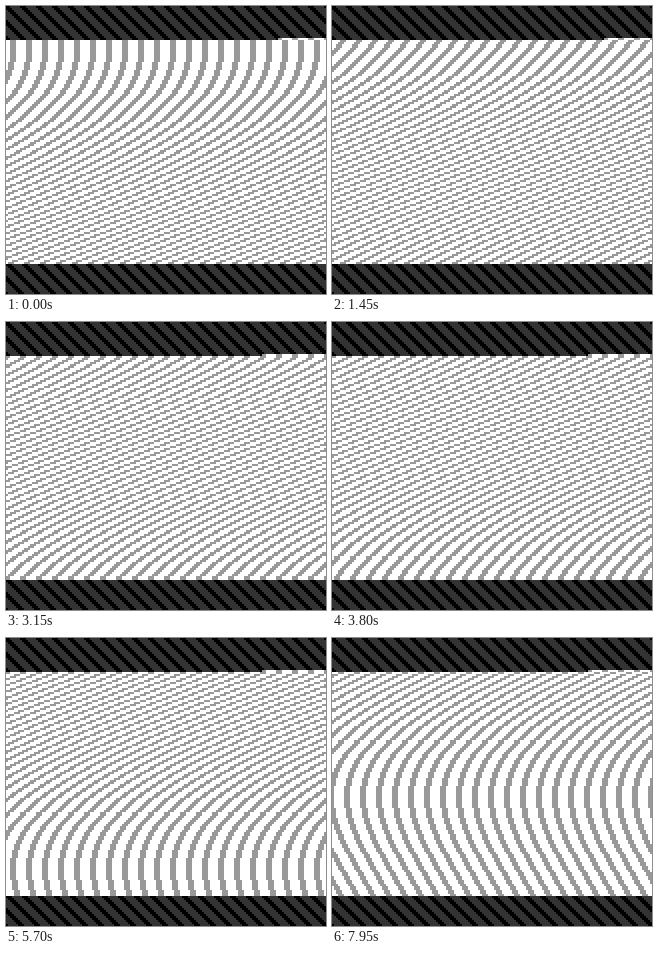
An HTML page with a canvas that plays this animation: 320 by 288 pixels, repeating every 8000 ms.

```html
<!DOCTYPE html>
<html lang="en">
<head>
<meta charset="utf-8">
<title>Raster wave</title>
<style>
  html, body { margin: 0; width: 100%; height: 100%; overflow: hidden; background: #000; }
  canvas { display: block; width: 320px; height: 288px; image-rendering: pixelated; }
</style>
</head>
<body>
<canvas id="screen" width="160" height="144"></canvas>
<script>
const W = 160, H = 144, TILE = 8, STRIPE = 3;
const TOP = 17, BOTTOM = 129;
const LOOP = 8000, TICK = 50, LINES_PER_TICK = 0.8, START = 0.7;
const AMPLITUDE = 64, PERIOD = 256, CENTER = 114;

const ctx = document.getElementById('screen').getContext('2d');
const mod = (n, m) => ((n % m) + m) % m;

function stripes(y, from, offset, base, ink) {
  ctx.fillStyle = base;
  ctx.fillRect(from, y, W - from, 1);
  ctx.fillStyle = ink;
  for (let x = mod(offset, TILE) - TILE; x < W; x += TILE) {
    const left = Math.max(x, from);
    const width = x + STRIPE - left;
    if (width > 0) ctx.fillRect(left, y, width, 1);
  }
}

const bandOffset = y => y - 1;

function waveOffset(y, shift) {
  const angle = 2 * Math.PI * (y + shift - CENTER) / PERIOD;
  return 6 - y - Math.floor(AMPLITUDE * Math.sin(angle));
}

function draw(tick) {
  const shift = Math.floor(tick * LINES_PER_TICK + START);
  for (let y = 0; y < H; y++) {
    if (y < TOP || y >= BOTTOM) stripes(y, 0, bandOffset(y), '#333', '#000');
    else stripes(y, 0, waveOffset(y, shift), '#fff', '#999');
  }
  // The palette switches part-way along the last line of the upper band.
  const edge = tick < 40 ? 136 : 128;
  stripes(TOP - 1, edge, bandOffset(TOP - 1), '#fff', '#999');
}

let last = -1;
function play(now) {
  const tick = Math.floor((now % LOOP) / TICK);
  if (tick !== last) draw(last = tick);
  requestAnimationFrame(play);
}
draw(0);
requestAnimationFrame(play);
</script>
</body>
</html>
```
